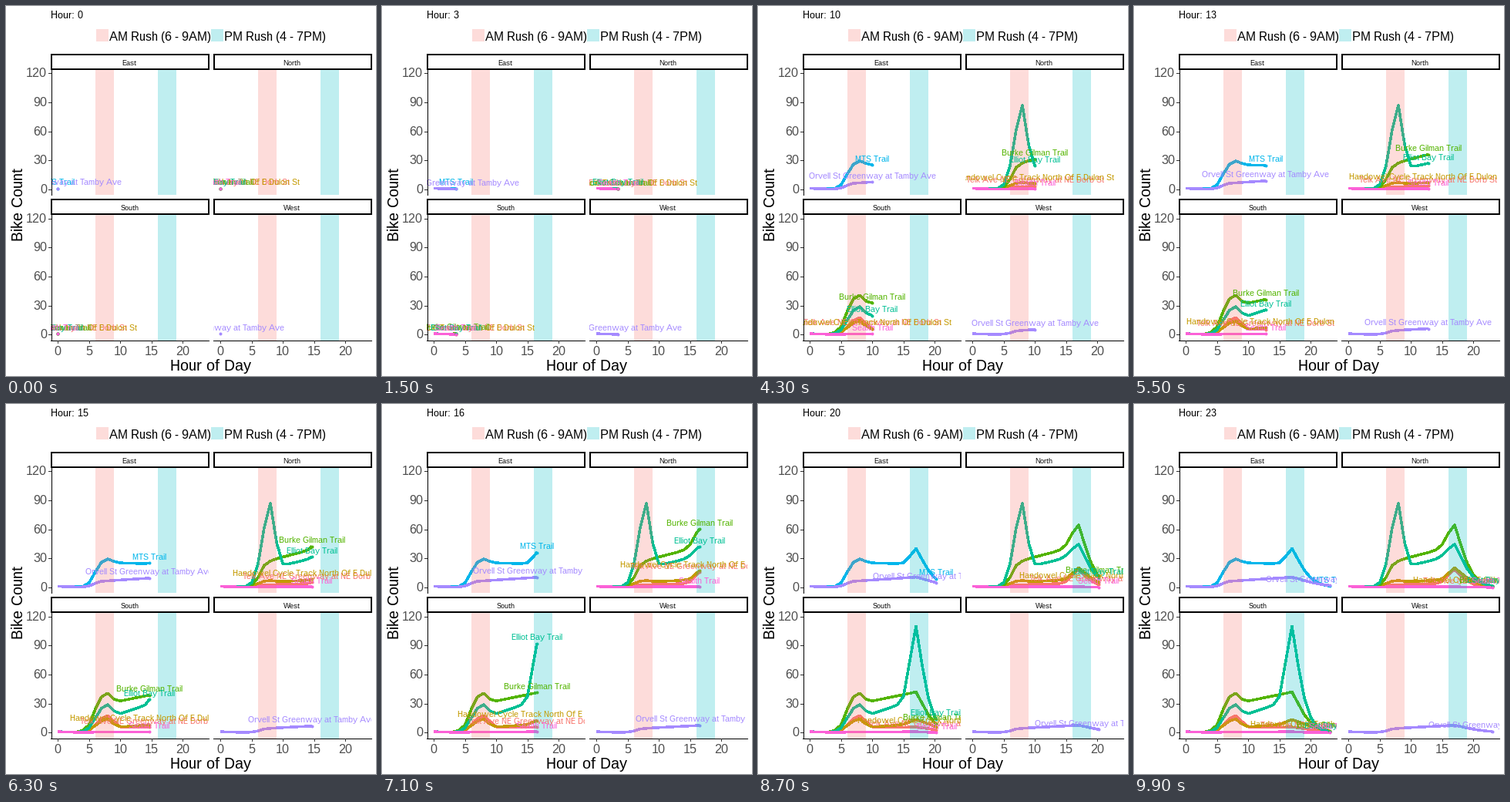
Animation, 480 px wide and 480 px high, one loop 10000 ms. Source, as a matplotlib script:

```python
import matplotlib.pyplot as plt
import numpy as np
from matplotlib.animation import FuncAnimation
from matplotlib.patches import Rectangle

plt.rcParams.update({
    "font.family": "Liberation Sans",
    "text.hinting": "native",
    "text.hinting_factor": 1,
})

SIZE, FRAMES, LAST_HOUR = 480, 100, 23
HOURS = np.arange(24)
X_UNIT, Y_UNIT = 8.1, 1.254
PANEL_W, PANEL_H = 205.3, 163.5
AM, PM = "#F8766D", "#00BFC4"

# left and top edge of each panel
PANELS = {"East": (58, 81.5), "North": (268.9, 81.5),
          "South": (58, 270), "West": (268.9, 270)}

COLORS = {
    "Telk Ave NE Greenway at NE Dorb St": "#F8766D",
    "Handowel Cycle Track North Of E Dulon St": "#C49A00",
    "Burke Gilman Trail": "#53B400",
    "Elliot Bay Trail": "#00C094",
    "MTS Trail": "#00B6EB",
    "Orvell St Greenway at Tamby Ave": "#A58AFF",
    "Sealth Trail": "#FB61D7",
}
TELK, HANDOWEL, BURKE, ELLIOT, MTS, ORVELL, SEALTH = COLORS

fig = plt.figure(figsize=(SIZE / 72, SIZE / 72), dpi=72, facecolor="white")
ax = fig.add_axes([0, 0, 1, 1])
ax.set_xlim(0, SIZE)
ax.set_ylim(SIZE, 0)
ax.axis("off")


def px(panel, hour):
    return PANELS[panel][0] + 9.3 + X_UNIT * hour


def py(panel, count):
    return PANELS[panel][1] + 156.3 - Y_UNIT * count


def box(x0, y0, x1, y1, **style):
    return ax.add_patch(Rectangle((x0, y0), x1 - x0, y1 - y0, **style))


def stroke(xs, ys, color="black"):
    ax.plot(xs, ys, color=color, lw=1, antialiased=False, zorder=6)


def write(x, y, text, size, ha="left", color="black", **kw):
    return ax.text(x, y, text, fontsize=size, ha=ha, va="baseline",
                   color=color, **kw)


def rides(noon, late, am=0, pm=0, wake=5.8, rise=2, fall=1, build=1.3, fade=2.3):
    """Hourly counts: a daytime level from noon to late, with a rush peak
    of am riders at 8 and pm riders at 17, fading out in the evening."""
    level = noon + (late - noon) * np.clip((HOURS - 8) / 9, 0, 1)
    level = level / (1 + np.exp((wake - HOURS) / 0.5))
    morning = np.exp(-((HOURS - 8) / np.where(HOURS < 8, rise, fall)) ** 2)
    build_up = np.exp(-(np.minimum(HOURS - 17, 0) / build) ** 2)
    evening = np.exp(-(np.maximum(HOURS - 17, 0) / fade) ** 1.3)
    night = np.exp(-HOURS / 3)
    return (level + am * morning + pm * build_up) * evening + night


class Trail:
    """One counter: its line, the dot at the tip and the label above it."""

    def __init__(self, panel, name, **shape):
        self.panel = panel
        self.counts = rides(**shape)
        color = COLORS[name]
        order = list(COLORS).index(name) / 10
        self.line, = ax.plot([], [], color=color, lw=2.5, antialiased=False,
                             solid_capstyle="butt", zorder=1 + order)
        self.dot, = ax.plot([], [], "o", color=color, ms=4, mew=0,
                            antialiased=False, zorder=2 + order)
        self.label = write(0, 0, name, 11, "center", color,
                           clip_on=True, zorder=4 + order)
        self.label.set_clip_path(clips[panel])

    def show(self, hour):
        hours = np.append(HOURS[HOURS < hour], hour)
        xs = px(self.panel, hours)
        ys = py(self.panel, np.interp(hours, HOURS, self.counts))
        self.line.set_data(xs, ys)
        self.dot.set_data(xs[-1:], ys[-1:])
        self.label.set_position((xs[-1], ys[-1] - 4.5))


def draw_panel(panel):
    left, top = PANELS[panel]
    right, bottom = left + PANEL_W, top + PANEL_H
    for start, color in ((6, AM), (16, PM)):
        box(px(panel, start), top, px(panel, start + 3), bottom,
            fc=color, alpha=0.25, lw=0, zorder=3)
    x0, y0 = round(left) + 1, int(top + 0.5) - 19
    box(x0, y0, x0 + 204, y0 + 19, fc="white", ec="black", lw=2,
        antialiased=False, zorder=6)
    write((left + right) / 2 - 0.5, y0 + 14, panel, 9, "center", zorder=7)

    if left < 100:
        stroke([58.5, 58.5], [top, bottom])
        for count in range(0, 121, 30):
            y = py(panel, count)
            stroke([55, 58], [y, y], "#333333")
            write(53, y + 5, str(count), 16, "right", "#4D4D4D")
    if top > 100:
        stroke([left, right], [433.5, 433.5])
        for hour in range(0, 21, 5):
            x = px(panel, hour)
            stroke([x, x], [434, 437], "#333333")
            write(x, 453, str(hour), 16, "center", "#4D4D4D")


clips = {}
for name, (left, top) in PANELS.items():
    clips[name] = box(left, top, left + PANEL_W, top + PANEL_H, fc="none", lw=0)
    draw_panel(name)

for x, color, text in ((117, AM, "AM Rush (6 - 9AM)"),
                       (266, PM, "PM Rush (4 - 7PM)")):
    box(x, 30, x + 16, 46, fc=color, alpha=0.25, lw=0)
    write(x + 17, 45, text, 16)
write(265.5, 473, "Hour of Day", 20, "center")
write(22, 257.5, "Bike Count", 20, "center", rotation=90,
      rotation_mode="anchor")
title = write(58, 16, "", 13)

trails = [
    Trail("East", MTS, noon=25.5, late=24, am=4, pm=16, rise=1.5, build=1.2),
    Trail("East", ORVELL, noon=6.7, late=10.5, fade=4),
    Trail("North", TELK, noon=2.6, late=4.5, pm=14, build=1.4, fade=2),
    Trail("North", HANDOWEL, noon=5.3, late=8.3, am=1.7, pm=11.7, fade=2.6),
    Trail("North", BURKE, noon=28, late=43, pm=21.5, wake=6.3, build=1.6,
          fade=2.1),
    Trail("North", ELLIOT, noon=20, late=33, am=67, pm=11.5, rise=1.5,
          build=1.7),
    Trail("North", SEALTH, noon=0.5, late=0.6),
    Trail("South", TELK, noon=5, late=5.7, am=12.5, fall=1.2, fade=4.5),
    Trail("South", HANDOWEL, noon=5, late=9, am=9, pm=4.5, rise=2.3, fade=3.8),
    Trail("South", BURKE, noon=30, late=42, am=11, rise=2.6, fall=0.9),
    Trail("South", ELLIOT, noon=15, late=35, am=14, pm=75, rise=2.2, fade=1.8),
    Trail("South", SEALTH, noon=0.6, late=0.9),
    Trail("West", ORVELL, noon=4.5, late=7.6, wake=6.3, fade=3.7),
]


def update(i):
    hour = LAST_HOUR * i / (FRAMES - 1)
    title.set_text(f"Hour: {round(hour)}")
    for trail in trails:
        trail.show(hour)
    return []


anim = FuncAnimation(fig, update, frames=FRAMES, interval=100,
                     repeat=True, repeat_delay=0, blit=False)
plt.show()
```
